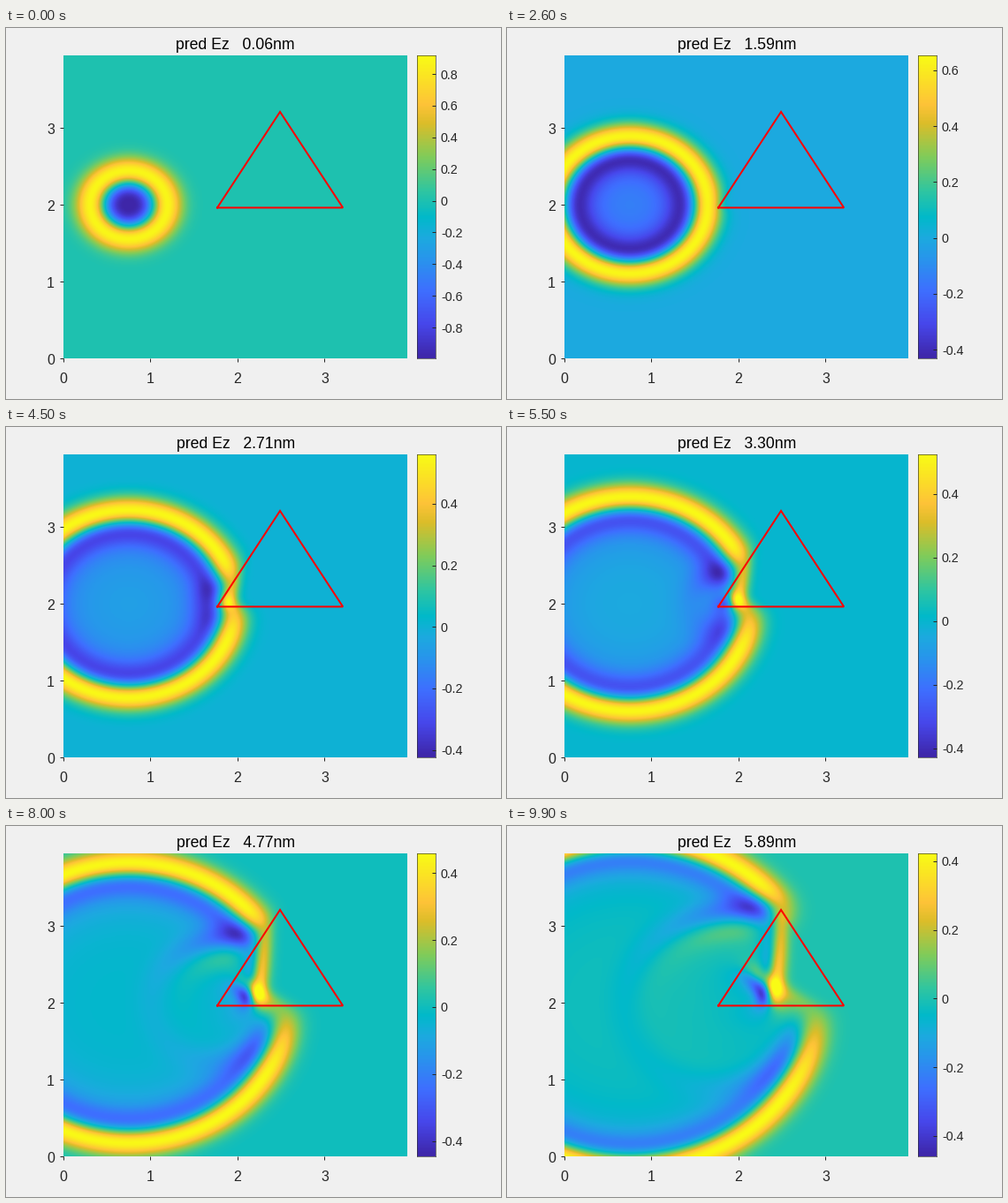
A matplotlib script that plays this animation: 560x420 px, repeating every 10000 ms.

```python
import numpy as np
import matplotlib.pyplot as plt
from matplotlib.animation import FuncAnimation
from matplotlib.colors import LinearSegmentedColormap
from matplotlib.ticker import FuncFormatter, MultipleLocator
from matplotlib.transforms import ScaledTranslation

W, H, DPI = 560, 420, 100
FRAMES, INTERVAL = 100, 100
PX = 72 / DPI                      # points per pixel
INK = "#262626"

plt.rcParams["font.family"] = "Liberation Sans"
plt.rcParams["axes.unicode_minus"] = False

PARULA = LinearSegmentedColormap.from_list("parula", [
    (0.000, "#3e26a8"), (0.111, "#4747eb"), (0.222, "#3e6fff"),
    (0.333, "#2797eb"), (0.397, "#1caadf"), (0.466, "#01b9ca"),
    (0.556, "#31c69f"), (0.667, "#81cc59"), (0.778, "#dcbd29"),
    (0.841, "#fec338"), (1.000, "#f9fb15")])

# Wave grid: the visible window plus a margin the waves can leave through
DX, CELLS, PAD = 0.025, 159, 44
DT = DX / (0.3 * np.sqrt(2))       # time shown in the title, per frame
STEP = 0.0172                      # distance travelled per frame
LEAD = 22                          # steps already run when the loop starts
SOURCE, PULSE = (0.75, 2.0), 0.2   # centre and width of the Gaussian pulse
EPS = 3.5                          # permittivity inside the triangle
LEFT, APEX, RIGHT = (1.767, 1.962), (2.488, 3.21), (3.21, 1.962)


def colour_limits(i):
    high = 0.622 / np.sqrt(0.46 + STEP * i)     # rings fade with the root of radius
    low = -(0.39 + 0.604 * np.exp(-i / 8) + 0.0007 * i)
    return low, high


def simulate():
    """Release a Gaussian and step the wave equation; return the visible frames."""
    axis = (np.arange(CELLS + 2 * PAD) - PAD) * DX
    x, y = np.meshgrid(axis, axis)

    half_width = (APEX[1] - y) * (RIGHT[0] - LEFT[0]) / 2 / (APEX[1] - LEFT[1])
    inside = (y >= LEFT[1]) & (np.abs(x - APEX[0]) <= half_width)
    coef = (STEP / DX) ** 2 / np.where(inside, EPS, 1.0)

    def push(u):
        lap = np.zeros_like(u)
        lap[1:-1, 1:-1] = (u[2:, 1:-1] + u[:-2, 1:-1] + u[1:-1, 2:]
                           + u[1:-1, :-2] - 4 * u[1:-1, 1:-1])
        return coef * lap

    u = np.exp(-((x - SOURCE[0]) ** 2 + (y - SOURCE[1]) ** 2) / PULSE ** 2)
    prev = u + push(u) / 2         # starts at rest
    view = slice(PAD, PAD + CELLS)
    out = []
    for _ in range(LEAD + FRAMES):
        out.append(u[view, view])
        prev, u = u, 2 * u - prev + push(u)
    out = np.array(out[LEAD:])
    return out * 0.645 / out[26].max()


field = simulate()
fig = plt.figure(figsize=(W / DPI, H / DPI), dpi=DPI, facecolor="#f0f0f0")


def px_axes(left, top, right, bottom):
    return fig.add_axes([left / W, 1 - bottom / H,
                         (right - left) / W, (bottom - top) / H])


ax = px_axes(65, 31, 454, 374)
span, edge = (CELLS - 1) * DX, DX / 2
image = ax.imshow(field[0], cmap=PARULA, origin="lower", aspect="auto",
                  interpolation="bilinear",
                  extent=(-edge, span + edge, -edge, span + edge))
ax.plot(*zip(LEFT, RIGHT, APEX, LEFT), color="red", lw=2 * PX,
        solid_joinstyle="miter")
ax.set(xlim=(0, span), ylim=(0, 3.945), xticks=range(4), yticks=range(4))
ax.spines[:].set_visible(False)
ax.tick_params(length=4 * PX, width=PX, color=INK, labelcolor=INK,
               labelsize=16 * PX)
ax.tick_params(axis="x", pad=11.5 * PX)
ax.tick_params(axis="y", pad=6 * PX)
for label in ax.get_yticklabels():
    drop = ScaledTranslation(0, -1.3 / DPI, fig.dpi_scale_trans)
    label.set_transform(label.get_transform() + drop)

cax = px_axes(465, 31, 486, 374)
ramp = cax.imshow(np.linspace(0, 1, 256)[:, None], cmap=PARULA,
                  origin="lower", aspect="auto", extent=(0, 1, 0, 1))
cax.set_xticks([])
cax.yaxis.tick_right()
cax.yaxis.set_major_locator(MultipleLocator(0.2))
cax.yaxis.set_major_formatter(FuncFormatter(lambda v, _: f"{round(v, 1) + 0.0:g}"))
cax.tick_params(axis="y", direction="in", length=4 * PX, width=PX, pad=6 * PX,
                color=INK, labelcolor=INK, labelsize=14.4 * PX)
cax.spines[:].set(linewidth=0.6 * PX, color=INK)

title = fig.text(259.75 / W, 1 - 24 / H, "", ha="center", va="baseline",
                 fontsize=17.6 * PX, color="black")


def draw(i):
    low, high = colour_limits(i)
    image.set_data(field[i])
    image.set_clim(low, high)
    ramp.set_extent((0, 1, low, high))
    cax.set_ylim(low, high)
    title.set_text(f"pred Ez   {(i + 1) * DT:.2f}nm")
    return image, ramp, title


anim = FuncAnimation(fig, draw, frames=FRAMES, interval=INTERVAL,
                     repeat=True, repeat_delay=0, blit=False)
plt.show()
```
